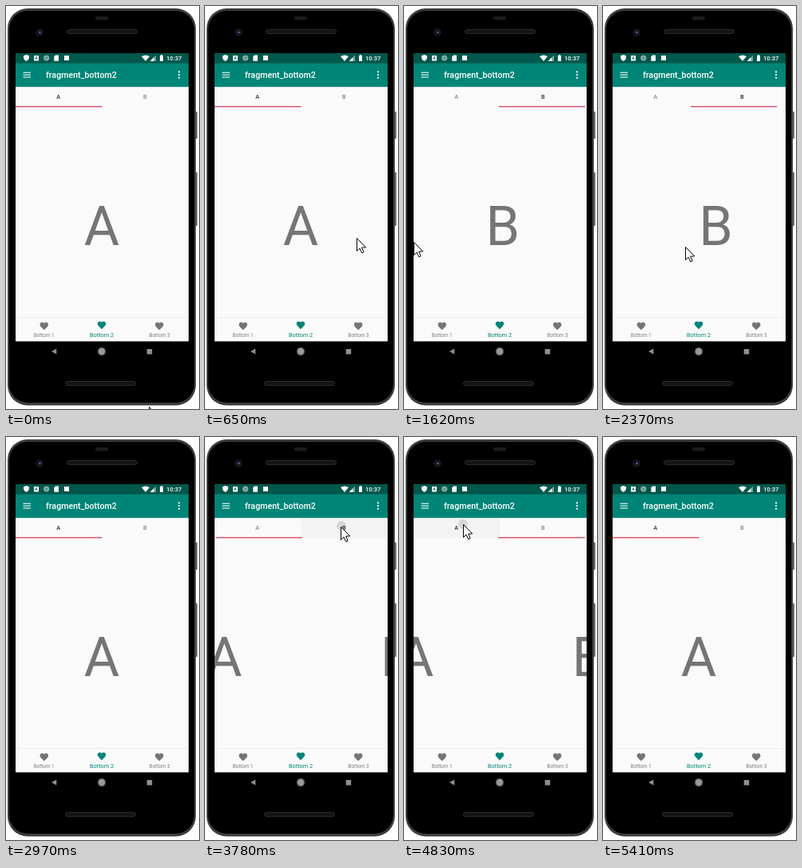
An HTML page with a canvas for the animation above (6.42 s loop, 242 by 504 pixels).

```html
<!DOCTYPE html>
<html lang="en">
<head>
<meta charset="utf-8">
<title>Bottom navigation with tabs</title>
<style>
html, body { margin: 0; width: 100%; height: 100%; overflow: hidden; background: #fff; }
canvas { display: block; width: 242px; height: 504px; }
</style>
</head>
<body>
<canvas id="stage"></canvas>
<script>
const W = 242, H = 504, LOOP = 6420;
const LEFT = 12, PAGE = 217, TAB = PAGE / 2, DP = 0.5275;
const TABS_TOP = 101.2, TABS_END = 126.5, NAV_TOP = 389, NAV_END = 419.4;
const TEAL = '#008577', GREY = '#757575', PAPER = '#fafafa';
const CLICK_B = 3758, CLICK_A = 4803;

const canvas = document.getElementById('stage');
const ctx = canvas.getContext('2d');
const dpr = window.devicePixelRatio || 1;
canvas.width = W * dpr;
canvas.height = H * dpr;

const heartPath = new Path2D('M12 21.35l-1.45-1.32C5.4 15.36 2 12.28 2 8.5 2 5.42 4.42 3 7.5 3' +
  'c1.74 0 3.41.81 4.5 2.09C13.09 3.81 14.76 3 16.5 3 19.58 3 22 5.42 22 8.5' +
  'c0 3.78-3.4 6.86-8.55 11.54z');

const bursts = [
  [210, 650, 7], [880, 1480, 9], [1540, 2060, 8], [2290, 2890, 9],
  [2970, 3470, 8], [3780, 4080, 5], [4220, 4600, 6], [4830, 5130, 5], [5270, 5410, 3]
];

const clamp = v => Math.max(0, Math.min(1, v));
const linear = p => p;
const smooth = p => p * p * (3 - 2 * p);
const quint = p => 1 - Math.pow(1 - p, 5);

// cubic-bezier(.4, 0, .2, 1)
function fastOutSlowIn(x) {
  let lo = 0, hi = 1;
  for (let i = 0; i < 24; i++) {
    const s = (lo + hi) / 2, r = 1 - s;
    if (1.2 * r * r * s + 0.6 * r * s * s + s * s * s < x) lo = s; else hi = s;
  }
  return lo * lo * (3 - 2 * lo);
}

// Time, x, y, easing towards this key
const cursorKeys = [
  [140, 179, 501, linear], [650, 190, 290, smooth], [840, 190, 291, linear],
  [1180, 94, 296, linear], [1480, 6, 295, linear], [1540, 8, 295, linear],
  [2060, 78, 296, smooth], [2260, 80, 297, linear], [2370, 104, 301, linear],
  [2830, 231, 303, linear], [2890, 250, 302, linear], [2970, 250, 282, linear],
  [3030, 225, 262, linear], [3470, 170, 112, smooth], [4160, 170, 112, linear],
  [4600, 74, 109, smooth], [5210, 74, 109, linear], [5270, 112, 128, linear],
  [5340, 190, 168, linear], [5410, 262, 210, linear]
];

function cursorAt(t) {
  let a = cursorKeys[0];
  for (const b of cursorKeys) {
    if (t < b[0]) {
      const p = b[3](clamp((t - a[0]) / (b[0] - a[0])));
      return [a[1] + (b[1] - a[1]) * p, a[2] + (b[2] - a[2]) * p];
    }
    a = b;
  }
  return [a[1], a[2]];
}

function held(t) {
  let last = 0;
  for (const [from, to, n] of bursts) {
    if (t < from) break;
    const step = (to - from) / (n - 1);
    last = from + Math.min(n - 1, Math.floor((t - from) / step + 1e-6)) * step;
  }
  return last;
}

// Page scroll (0 = A, 1 = B), indicator position and selected tab
function pagerAt(t) {
  if (t >= CLICK_A) {
    return {
      scroll: 1 - quint(clamp((t - CLICK_A) / 200)),
      mark: 1 - fastOutSlowIn(clamp((t - CLICK_A) / 300)), tab: 0
    };
  }
  if (t >= CLICK_B) {
    return {
      scroll: quint(clamp((t - CLICK_B) / 200)),
      mark: fastOutSlowIn(clamp((t - CLICK_B) / 300)), tab: 1
    };
  }
  let s;
  if (t < 1500) s = Math.max(0, t - 930) * 0.308 / PAGE;
  else if (t < 2200) s = 0.81 + 0.19 * quint(clamp((t - 1500) / 300));
  else if (t < 2750) s = 1 - Math.max(0, t - 2288) * 0.28 / PAGE;
  else s = 0.404 * (1 - quint(clamp((t - 2750) / 210)));
  return { scroll: s, mark: s, tab: s > 0.5 ? 1 : 0 };
}

function rect(x, y, w, h, fill) {
  ctx.fillStyle = fill;
  ctx.fillRect(x, y, w, h);
}

function pill(x, y, w, h, r, fill, line) {
  ctx.beginPath();
  ctx.roundRect(x, y, w, h, r);
  ctx.fillStyle = fill;
  ctx.fill();
  if (line) { ctx.strokeStyle = line; ctx.lineWidth = 1; ctx.stroke(); }
}

function disc(x, y, r, fill) {
  ctx.beginPath();
  ctx.arc(x, y, r, 0, Math.PI * 2);
  ctx.fillStyle = fill;
  ctx.fill();
}

function poly(fill, ...pts) {
  ctx.beginPath();
  for (let i = 0; i < pts.length; i += 2) ctx.lineTo(pts[i], pts[i + 1]);
  ctx.closePath();
  ctx.fillStyle = fill;
  ctx.fill();
}

function text(str, x, y, size, fill, weight = 400, align = 'center') {
  ctx.font = `${weight} ${size}px Roboto, sans-serif`;
  ctx.textAlign = align;
  ctx.fillStyle = fill;
  ctx.fillText(str, x, y);
}

function heart(x, y, fill) {
  ctx.save();
  ctx.translate(x, y);
  ctx.scale(DP, DP);
  ctx.translate(-12, -12);
  ctx.fillStyle = fill;
  ctx.fill(heartPath);
  ctx.restore();
}

function drawPhone() {
  rect(0, 0, W, H, '#fff');
  pill(236, 132, 4, 34, 1, '#6c6c6c');
  pill(236, 208, 4, 67, 1, '#6c6c6c');
  pill(2, 3, 236, 496.5, 25, '#3c3c3c');
  pill(4, 6, 232, 490, 23, '#000');
  pill(112, 13, 16, 4.5, 2, '#1c1c1c');
  pill(76.5, 29.5, 88, 5, 2.5, '#141414', '#2c2c2c');
  pill(74.5, 469.5, 88, 5, 2.5, '#141414', '#2c2c2c');
  disc(42, 33, 4.8, '#17171b');
  disc(42, 33, 2.6, '#10152a');
  disc(42.5, 33, 1.2, '#5a6aa8');
}

function drawStatus() {
  rect(LEFT, 59, PAGE, 13, '#00574b');
  poly('#fff', 25.5, 61, 29, 62.3, 29, 65, 27.8, 67.3, 25.5, 69, 23.2, 67.3, 22, 65, 22, 62.3);
  rect(35, 62, 6, 6.5, '#fff');
  text('A', 38, 67.3, 5, '#00574b', 700);
  disc(50.7, 65, 3.6, '#86ada7');
  disc(50.7, 65, 1.6, '#5d918a');
  poly('#fff', 62, 61.5, 66, 61.5, 66, 68.7, 60.3, 68.7, 60.3, 63.2);
  rect(73, 62, 6, 6, '#fff');

  ctx.beginPath();
  ctx.moveTo(175, 69);
  ctx.lineTo(170, 63);
  ctx.quadraticCurveTo(175, 59.8, 180, 63);
  ctx.fillStyle = '#fff';
  ctx.fill();
  poly('#7aa59f', 188, 61.5, 188, 69, 180.7, 69);
  poly('#fff', 185.3, 64.3, 185.3, 69, 180.7, 69);
  rect(193, 62, 4, 7, '#fff');
  rect(194, 61, 2, 1, '#fff');
  text('10:37', 201, 68, 7.6, '#fff', 500, 'left');
}

function drawToolbar() {
  rect(LEFT, 71.6, PAGE, TABS_TOP - 71.6, TEAL);
  for (let i = 0; i < 3; i++) {
    rect(21.5, 82.7 + i * 2.9, 9.5, 1.05, '#fff');
    disc(217, 82.4 + i * 3.7, 1.1, '#fff');
  }
  text('fragment_bottom2', 50, 90.2, 10.66, '#fff', 500, 'left');
}

function drawRipple(t, start, x, y, tabX) {
  const p = (t - start) / 300;
  if (p < 0 || p >= 1) return;
  const fade = p < 0.5 ? 1 : (1 - p) * 2;
  ctx.save();
  ctx.beginPath();
  ctx.rect(tabX, 101, TAB, TABS_END - 101);
  ctx.clip();
  rect(tabX, 101, TAB, 26, `rgba(0,0,0,${0.028 * fade})`);
  disc(x, y, 6 + 95 * Math.max(0, p - 0.1), `rgba(0,0,0,${0.12 * fade})`);
  ctx.restore();
}

function drawPager(t) {
  const { scroll, mark, tab } = pagerAt(t);
  ctx.save();
  ctx.beginPath();
  ctx.rect(LEFT, 101, PAGE, NAV_TOP - 101);
  ctx.clip();
  rect(LEFT, 101, PAGE, NAV_TOP - 101, PAPER);
  drawRipple(t, CLICK_B, 171, 111, LEFT + TAB);
  drawRipple(t, CLICK_A, 74, 109, LEFT);
  ['A', 'B'].forEach((name, i) => {
    text(name, LEFT + TAB * (i + 0.5) - 0.5, 116.3, 7.4, i === tab ? '#303030' : '#858585', 500);
    text(name, 120 + (i - scroll) * PAGE, 299.2, 68.2, GREY);
  });
  rect(LEFT + mark * TAB, TABS_END - 1.3, TAB, 1.3, '#d8405c');
  ctx.restore();
}

function drawBottom() {
  rect(LEFT, 419, PAGE, 25, '#000');
  rect(LEFT, NAV_TOP, PAGE, NAV_END - NAV_TOP, PAPER);
  rect(LEFT, NAV_TOP, PAGE, 1, '#ececec');
  for (let i = 0; i < 3; i++) {
    const on = i === 1, color = on ? TEAL : GREY;
    heart(47.8 + i * 72.2, on ? 399.2 : 400.3, color);
    text('Bottom ' + (i + 1), 47.7 + i * 72.4, on ? 414 : 413.7, on ? 7.4 : 6.34, on ? TEAL : '#808080');
  }
  poly('#8f8f8f', 57, 432, 63.3, 428.4, 63.3, 435.6);
  disc(120, 432, 5.2, '#555');
  disc(120, 432, 3.9, '#9a9a9a');
  rect(176.7, 429, 6.5, 6.5, '#8f8f8f');
}

function drawCursor(x, y) {
  ctx.save();
  ctx.translate(Math.round(x) + 0.5, Math.round(y) + 0.5);
  poly('#fff', 0, 0, 0, 16, 3.6, 12.6, 6.2, 18.3, 8.6, 17.2, 6.1, 11.6, 11.2, 11.4);
  ctx.strokeStyle = '#000';
  ctx.lineWidth = 1;
  ctx.stroke();
  ctx.restore();
}

function draw(now) {
  const t = held(now % LOOP);
  ctx.setTransform(dpr, 0, 0, dpr, 0, 0);
  drawPhone();
  drawStatus();
  drawPager(t);
  drawToolbar();
  drawBottom();
  drawCursor(...cursorAt(t));
}

const begin = performance.now();
function tick() {
  draw(performance.now() - begin);
  requestAnimationFrame(tick);
}
tick();
</script>
</body>
</html>
```
